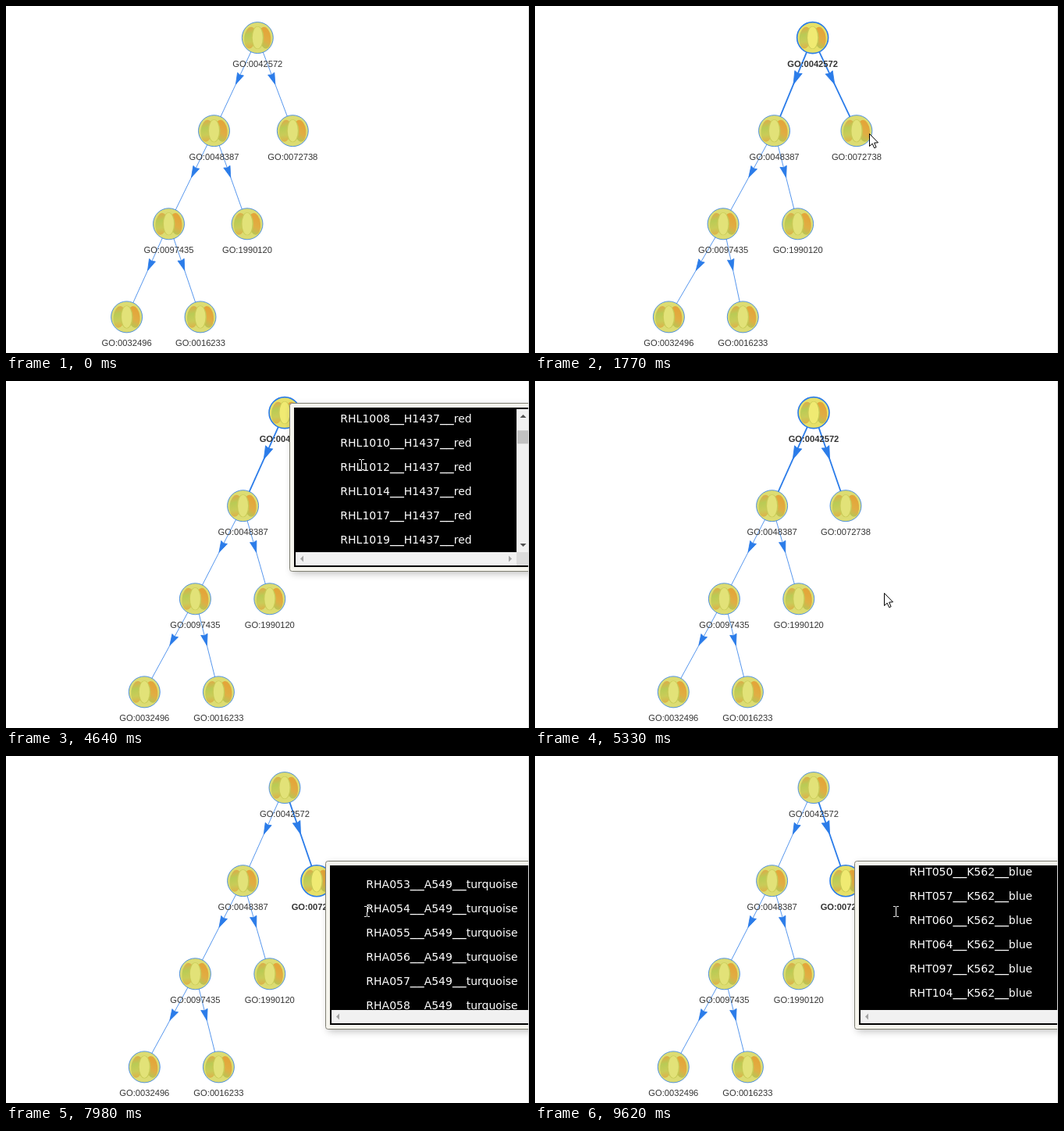
Recreate the animation shown at these times as an HTML page with a canvas. Size 670 px wide and 444 px high, loop 9.68 s.

```html
<!DOCTYPE html>
<html lang="en">
<head>
<meta charset="utf-8">
<title>Term tree</title>
<style>
html, body { margin: 0; width: 100%; height: 100%; overflow: hidden; background: #fff; }
canvas { display: block; }
</style>
</head>
<body>
<canvas id="stage" width="670" height="444"></canvas>
<script>
const ctx = document.getElementById('stage').getContext('2d');
const W = 670, H = 444, LOOP = 9680;
const BLUE = '#2b7ce9';
const SANS = '"Liberation Sans", Arial, sans-serif';
const WIDE = '"DejaVu Sans", Verdana, sans-serif';
const DRAG = 70, PEAK = 950, REST = 2000;

const clamp = v => Math.max(0, Math.min(1, v));
const ease = (t, a, b) => { const u = clamp((t - a) / (b - a)); return u * u * (3 - 2 * u); };

// Each node drifts from x0 to x1; pull is how far the drag takes it along
function node(id, parent, x0, x1, pull = 0) {
  const level = parent ? parent.level + 1 : 0;
  return { id: 'GO:' + id, parent, level, x0, x1, pull, y: 40.6 + 119.1 * level };
}
const root = node('0042572', null, 322.3, 357, 210);
const left = node('0048387', root, 266.5, 303.6, 36);
const right = node('0072738', root, 367.3, 398, 124);
const inner = node('0097435', left, 208.5, 242.4);
const NODES = [
  root, left, right, inner,
  node('1990120', left, 309, 337.8),
  node('0032496', inner, 154.6, 177.3),
  node('0016233', inner, 249, 272.4)
];

function nodeX(n, t) {
  const lag = Math.max(1, (n.level / 2) ** 5);
  const drift = ease(t, DRAG, REST) ** lag;
  const back = n.level ? REST : REST - 300;
  const bump = ease(t, DRAG, PEAK) * (1 - ease(t, PEAK, back));
  return n.x0 + (n.x1 - n.x0) * drift + n.pull * bump;
}

// Pointer moves after the drag: start, end, x, y
const MOVES = [
  [1000, 1770, 428, 163], [1780, 2070, 397, 162], [2070, 2620, 346, 36],
  [2769, 2770, 358, 41], [3200, 3480, 455, 96], [4520, 5330, 447, 271],
  [5690, 6260, 404, 147], [6860, 7050, 462, 199]
];

function pointerAt(t) {
  let x = nodeX(root, Math.min(t, MOVES[0][0])) + 8, y = 45;
  for (const [a, b, toX, toY] of MOVES) {
    const u = ease(t, a, b);
    x += (toX - x) * u;
    y += (toY - y) * u;
  }
  return { x, y };
}

const range = (a, b) => Array.from({ length: b - a + 1 }, (_, i) => a + i);
const named = (prefix, tail, list) => list.map(n => prefix + String(n).padStart(3, '0') + tail);
const POPUPS = [
  {
    x: 363, y: 28, from: 2930, to: 5100, first: 3710, gap: 230, ticks: 2, max: 228,
    rows: named('RHL', '__H1437__red', range(0, 13).map(i => 995 + Math.trunc(2.25 * i - 0.4)))
  },
  {
    x: 409, y: 134, from: 6500, to: LOOP, first: 7190, gap: 320, ticks: 8, max: 885,
    rows: [
      ...named('RHA', '__A549__turquoise', [...range(16, 18), ...range(28, 32), ...range(51, 64)]),
      ...named('RHT', '__K562__blue', [...range(44, 48), 50, 57, 60, 64, 97, 104])
    ]
  }
];

// Every wheel tick scrolls 114 px and slows down
function scrollAt(p, t) {
  let s = 0;
  for (let i = 0; i < p.ticks; i++) {
    const dt = t - p.first - i * p.gap;
    if (dt >= 0) s += 114 * (1 - clamp(1 - (dt + 60) / 220) ** 2);
  }
  return Math.min(p.max, Math.round(s));
}

function poly(points, color) {
  ctx.beginPath();
  points.forEach(([x, y]) => ctx.lineTo(x, y));
  ctx.closePath();
  ctx.fillStyle = color;
  ctx.fill();
}

function blob(x, y, rx, ry, turn, fill) {
  ctx.beginPath();
  ctx.ellipse(x, y, rx, ry, turn, 0, Math.PI * 2);
  ctx.fillStyle = fill;
  ctx.fill();
}

function rect(x, y, w, h, color) {
  ctx.fillStyle = color;
  ctx.fillRect(x, y, w, h);
}

function fade(x0, y0, x1, y1, ...colors) {
  const g = ctx.createLinearGradient(x0, y0, x1, y1);
  colors.forEach((c, i) => g.addColorStop(i / (colors.length - 1), c));
  return g;
}

function drawEdge(a, b, bold) {
  ctx.strokeStyle = BLUE;
  ctx.lineWidth = bold ? 1.8 : 0.8;
  ctx.beginPath();
  ctx.moveTo(a.x, a.y);
  ctx.lineTo(b.x, b.y);
  ctx.stroke();
  const len = bold ? 16.8 : 14.4;
  ctx.save();
  ctx.translate((a.x + b.x) / 2, (a.y + b.y) / 2);
  ctx.rotate(Math.atan2(b.y - a.y, b.x - a.x));
  poly([[0, 0], [-len, len * 0.3], [-len * 0.9, 0], [-len, -len * 0.3]], BLUE);
  ctx.lineWidth = 0.8;
  ctx.stroke();
  ctx.restore();
}

function drawNode(n, bold) {
  ctx.save();
  ctx.translate(n.x, n.y);
  blob(0, 0, 20, 20, 0, bold ? '#e6e068' : '#dcdc72');
  blob(-9.5, 0, 7.5, 14, 0.12, fade(-12, -13, -8, 14, '#dcae4a', '#b9cb55', '#c9cc58', '#deb048'));
  blob(9.5, 0, 7.5, 14, -0.12, fade(15, -6, 4, 12, '#e3a63a', '#e0ae44', '#b4c756'));
  blob(0, 0, 8, 14.5, 0, '#c8ca56');
  blob(0, 0, 6.5, 14, 0, bold ? '#f0ea72' : '#e2e278');
  ctx.beginPath();
  ctx.arc(0, 0, 20, 0, Math.PI * 2);
  ctx.strokeStyle = BLUE;
  ctx.lineWidth = bold ? 1.6 : 0.8;
  ctx.stroke();
  ctx.restore();
  ctx.fillStyle = '#343434';
  ctx.font = (bold ? 'bold ' : '') + '11.2px ' + SANS;
  ctx.textAlign = 'center';
  ctx.fillText(n.id, n.x, Math.round(n.y + 37.4));
}

// Underscores are set larger so that they join into one bar
function drawRow(text, cx, y) {
  const parts = text.split(/(__)/).map(s => {
    const bar = s === '__';
    const font = (bar ? 17.8 : 14) + 'px ' + WIDE;
    ctx.font = font;
    return { s, font, up: bar ? 1.2 : 0, w: ctx.measureText(s).width };
  });
  let x = cx - parts.reduce((sum, p) => sum + p.w, 0) / 2;
  ctx.textAlign = 'left';
  for (const p of parts) {
    ctx.font = p.font;
    ctx.fillText(p.s, x, y - p.up);
    x += p.w;
  }
}

// Small scroll bar triangle; turn counts quarter turns from "up"
function arrow(x, y, turn, active) {
  ctx.save();
  ctx.translate(x, y);
  ctx.rotate(turn * Math.PI / 2);
  poly([[-4, 2], [0, -2], [4, 2]], active ? '#505050' : '#a3a3a3');
  ctx.restore();
}

function drawPopup(p, scroll) {
  ctx.save();
  ctx.translate(p.x, p.y);
  ctx.beginPath();
  ctx.roundRect(0.5, 0.5, 320, 215, 3);
  ctx.save();
  ctx.shadowColor = 'rgba(0,0,0,0.25)';
  ctx.shadowBlur = 10;
  ctx.shadowOffsetX = ctx.shadowOffsetY = 3;
  ctx.fillStyle = '#f5f4ed';
  ctx.fill();
  ctx.restore();
  ctx.strokeStyle = '#808074';
  ctx.lineWidth = 1;
  ctx.stroke();
  rect(6, 6, 305, 204, '#000');

  ctx.save();
  ctx.beginPath();
  ctx.rect(8, 8, 283, 183);
  ctx.clip();
  ctx.fillStyle = '#fff';
  ctx.font = 'bold 14px ' + WIDE;
  ctx.textAlign = 'center';
  ctx.fillText('Component 1:', 149.5, 36 - scroll);
  p.rows.forEach((row, i) => {
    const y = 67 + 31 * i - scroll;
    if (y > 0 && y < 210) drawRow(row, 149.5, y);
  });
  ctx.restore();

  rect(291, 8, 17, 183, '#f1f1f1');
  rect(8, 191, 283, 17, '#f1f1f1');
  rect(291, 191, 17, 17, '#dcdcdc');
  rect(292, 25 + scroll * 0.045, 15, 17, '#c1c1c1');
  arrow(299.5, 17, 0, scroll > 0);
  arrow(299.5, 182, 2, true);
  arrow(16, 199.5, 3, false);
  arrow(283, 199.5, 1, false);
  ctx.restore();
}

function drawPointer({ x, y }, popup) {
  const beam = popup && x > popup.x + 8 && y > popup.y + 8 && y < popup.y + 191;
  ctx.save();
  ctx.translate(Math.round(x), Math.round(y));
  if (beam) {
    ctx.globalCompositeOperation = 'difference';
    rect(0, -6, 1, 12, '#fff');
    for (const side of [-3, 1]) {
      rect(side, -7, 3, 1, '#fff');
      rect(side, 6, 3, 1, '#fff');
    }
  } else {
    ctx.translate(0.5, 0.5);
    poly([[0, 0], [0, 16], [3.7, 12.6], [6.2, 18.2], [8.6, 17.2], [6.2, 11.6], [11, 11.3]], '#fff');
    ctx.strokeStyle = '#000';
    ctx.lineWidth = 1;
    ctx.stroke();
  }
  ctx.restore();
}

function draw(t) {
  rect(0, 0, W, H, '#fff');
  const chosen = t < 100 ? null : t < 6190 ? root : right;
  for (const n of NODES) n.x = nodeX(n, t);
  for (const n of NODES) {
    if (n.parent) drawEdge(n.parent, n, chosen === n.parent || chosen === n);
  }
  for (const n of NODES) drawNode(n, n === chosen);
  const popup = POPUPS.find(p => t >= p.from && t < p.to);
  if (popup) drawPopup(popup, scrollAt(popup, t));
  if (t >= DRAG) drawPointer(pointerAt(t), popup);
  rect(669, 0, 1, H, '#dcdcdc');
}

const begin = performance.now();
function tick() {
  draw((performance.now() - begin) % LOOP);
  requestAnimationFrame(tick);
}
tick();
</script>
</body>
</html>
```
